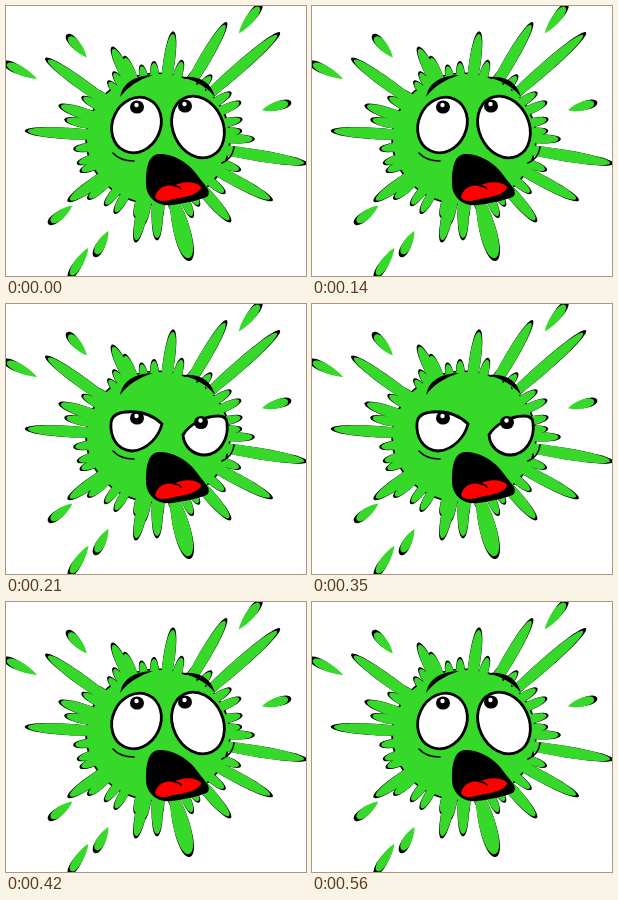
Recreate the animation shown at these times as an HTML page. Size 300 by 270 pixels, loop 0.63 s.

```html
<!DOCTYPE html>
<html lang="en">
<head>
<meta charset="utf-8">
<title>Startled splat</title>
<style>
html, body { margin: 0; width: 100%; height: 100%; overflow: hidden; background: #fff; }
svg { display: block; width: 100vw; height: 100vh; }
.line { fill: none; stroke: #000; stroke-width: 1.6; stroke-linecap: round; }
.eye { fill: #fff; stroke: #000; stroke-width: 2.8; }
</style>
</head>
<body>
<svg viewBox="0 0 300 270">
  <defs>
    <g id="splat"></g>
    <g id="pupil">
      <ellipse rx="7" ry="6.6"/>
      <circle cx="-.5" cy="-2" r="2.2" fill="#fff"/>
    </g>
  </defs>
  <use href="#splat" transform="translate(152 133) scale(1.025) translate(-152 -133)"/>
  <use href="#splat" fill="#36d92a"/>

  <path d="M114 91Q118 70 147 69Q125 76 114 91Z"/>
  <path d="M176 71Q203 69 209 91Q198 77 176 71Z"/>
  <path class="line" d="M107 147Q114 155 128 155M228 141Q227 152 216 157"/>

  <g id="wide">
    <ellipse class="eye" rx="24" ry="28.500" transform="translate(130.500 119) rotate(25)"/>
    <ellipse class="eye" rx="25" ry="32" transform="translate(192 121) rotate(-25)"/>
    <use href="#pupil" x="131" y="101"/>
    <use href="#pupil" x="179" y="100"/>
  </g>

  <g id="squint">
    <path class="eye" d="M105 119Q106 109 120 108Q142 106 156 120C153 132 142 146 126 147C110 146 104 132 105 119Z"/>
    <path class="eye" d="M177 131C182 122 197 112 212 112Q221 112 221 119C223 135 214 150 199 151C186 151 178 142 177 131Z"/>
    <use href="#pupil" x="131" y="114"/>
    <use href="#pupil" x="195" y="118.500"/>
  </g>

  <path d="M152 148C168 147 184 158 192 170C199 180 205 183 202 190C196 194 180 197 166 199C150 201 140 190 140 178C140 168 140 150 152 148Z"/>
  <path fill="#fe0000" d="M149 191C152 181 160 178 168 180C176 175 190 175 195 181C194 188 180 191 168 193C158 196 151 196 149 191Z"/>
  <path class="line" d="M168 180Q173 180 175 183"/>
</svg>
<script>
const $ = id => document.getElementById(id);
const STEP = 70, LOOP = 630;
const CX = 152, CY = 133, RX = 71, RY = 65;

// tips of the long arms, and outer ends of the loose drops
const arms = [
  [42, 54], [107, 43], [167, 28], [219, 19], [271, 29], [298, 157], [264, 193],
  [223, 214], [151, 232], [130, 234], [64, 194], [22, 125], [55, 100]
];
const drops = [[1, 58], [63, 31], [253, 1], [282, 97], [90, 248], [65, 269], [45, 216]];

let seed = 7;
const random = () => (seed = seed * 16807 % 2147483647) / 2147483647;

// a rounded lobe that ends at (x, y) and reaches back towards the centre
function lobe(x, y, len, width, root = .4) {
  const turn = Math.atan2(y - CY, x - CX) * 180 / Math.PI;
  return `<path transform="translate(${x} ${y}) rotate(${turn})" d="M${-len} 0
    C${-len * (1 - root)} ${-width} 0 ${-width} 0 0
    C0 ${width} ${-len * (1 - root)} ${width} ${-len} 0Z"/>`;
}

function fringe(count) {
  let out = "";
  for (let i = 0; i < count; i++) {
    const a = (i + random() * .5) / count * 2 * Math.PI;
    const r = 1.1 + random() * .25;
    out += lobe(CX + RX * r * Math.cos(a), CY + RY * r * Math.sin(a), 50, 6);
  }
  return out;
}

const reach = (x, y) => Math.hypot(x - CX, y - CY);

$("splat").innerHTML =
  `<ellipse cx="${CX}" cy="${CY}" rx="${RX}" ry="${RY}"/>` +
  fringe(38) +
  arms.map(([x, y]) => lobe(x, y, reach(x, y) - 35, 7.5, .2)).join("") +
  lobe(183, 252, 75, 11) +
  drops.map(([x, y]) => lobe(x, y, reach(x, y) * .2, 6)).join("");

function draw(ms) {
  const squint = Math.floor(ms % LOOP / STEP) % 2 === 1;
  $("wide").style.display = squint ? "none" : "";
  $("squint").style.display = squint ? "" : "none";
}

const start = performance.now();
function tick() {
  draw(performance.now() - start);
  requestAnimationFrame(tick);
}
draw(0);
requestAnimationFrame(tick);
</script>
</body>
</html>
```
